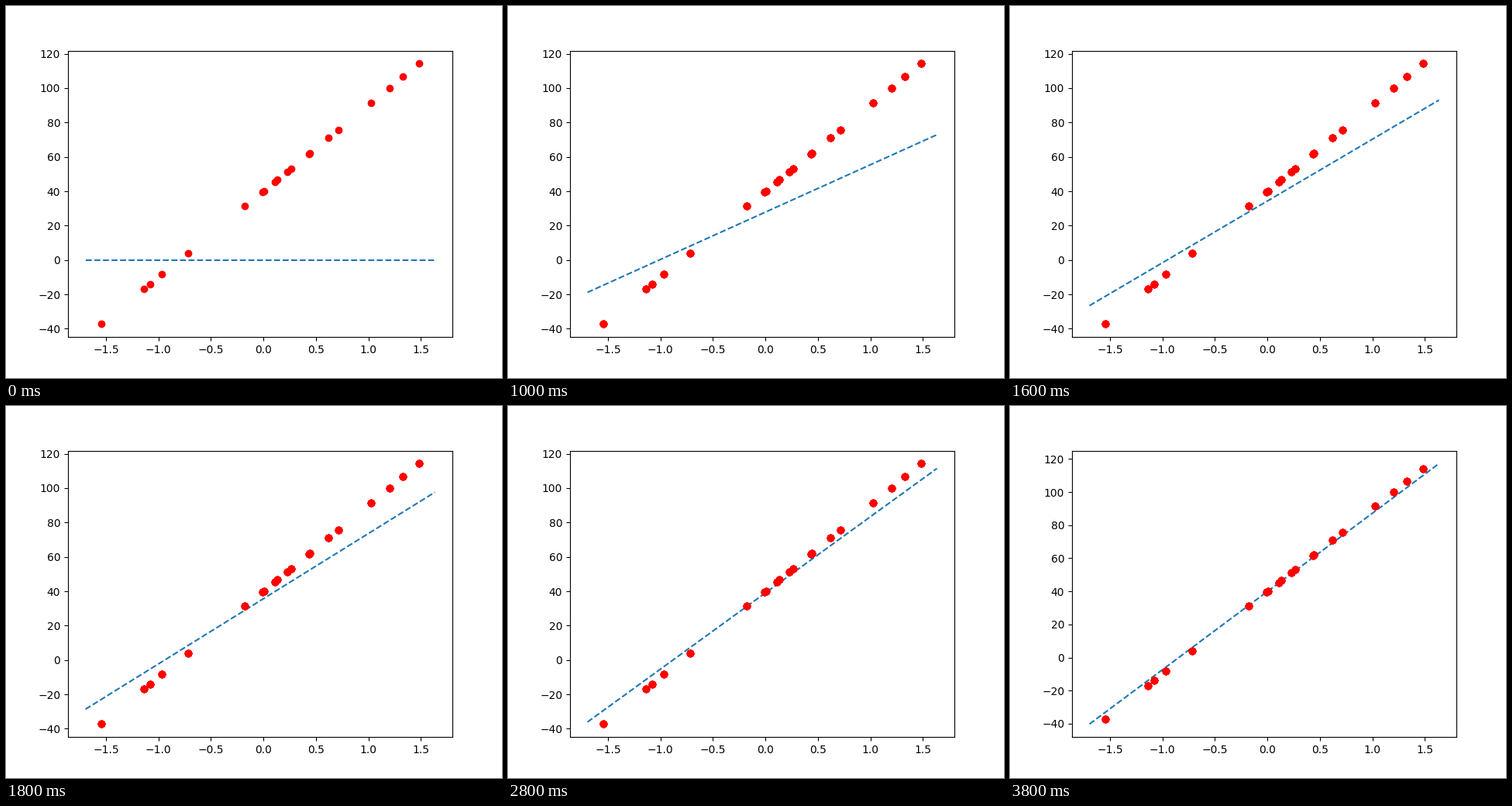
Animation of 640x480 px, one loop 4 s. Source, as a matplotlib script:

```python
import numpy as np
import matplotlib.pyplot as plt
from matplotlib.animation import FuncAnimation

FRAMES = 20
RATE = 0.01
OVERDRAW = 6  # stacked markers give the hard-edged dots after the start

np.random.seed(10)
x = np.random.randn(20)
y = 50 * x + 40


def fit_history(steps):
    """Slope and intercept after each pass of stochastic gradient descent."""
    w = b = 0.0
    history = []
    for _ in range(steps):
        history.append((w, b))
        for xi, yi in zip(x, y):
            err = yi - (w * xi + b)
            w += RATE * err * xi
            b += RATE * err
    return history


fits = fit_history(FRAMES)
ends = np.array([x.min() - 0.15, x.max() + 0.15])

fig, ax = plt.subplots(figsize=(6.4, 4.8), dpi=100)
line, = ax.plot(ends, 0 * ends, "--")
dots = [ax.plot(x, y, "ro")[0] for _ in range(OVERDRAW)]


def update(i):
    w, b = fits[i]
    line.set_ydata(w * ends + b)
    for dot in dots[1:]:
        dot.set_visible(i > 0)
    ax.relim()
    ax.autoscale_view()
    return [line, *dots]


anim = FuncAnimation(fig, update, frames=FRAMES, interval=200,
                     repeat=True, repeat_delay=0)
plt.show()
```
